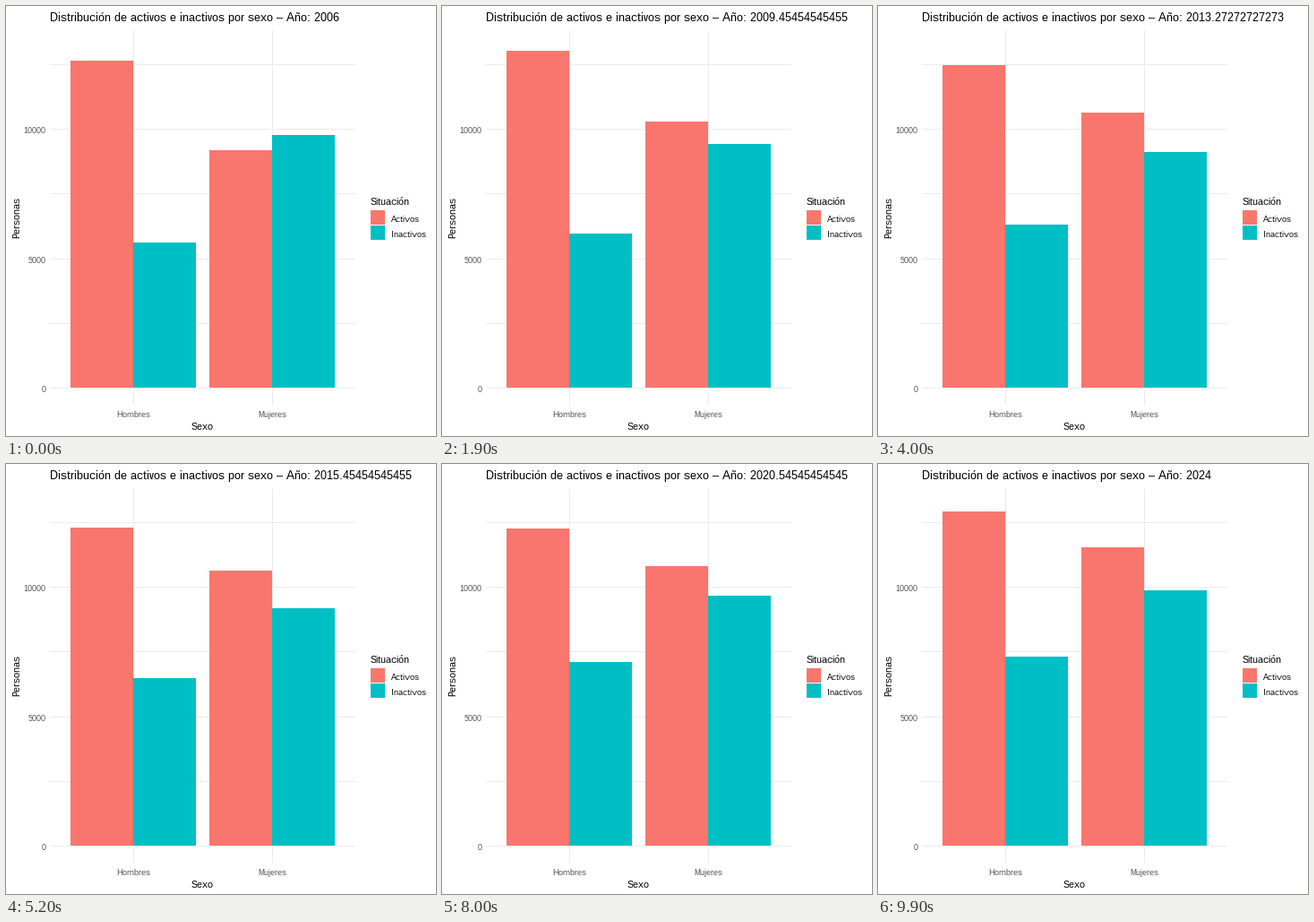
A matplotlib script that plays this animation: 480 by 480 pixels, repeating every 10000 ms.

```python
import numpy as np
import matplotlib.pyplot as plt
from matplotlib.animation import FuncAnimation
from matplotlib.patches import Rectangle

SIZE, DPI = 480, 72  # at 72 dpi one point is one pixel
FRAMES, INTERVAL = 100, 100
CORAL, TEAL, GRID, GREY = "#F8766D", "#00BFC4", "#EBEBEB", "#4D4D4D"
BASE = 426       # pixel row of the zero line
SCALE = 0.0289   # pixels per person
BAR_W = 70
TITLE, HEADING, SMALL = 13, 11, 9

# Crisp, fully hinted glyphs on whole pixels
plt.rcParams.update({"font.family": "Liberation Sans",
                     "text.hinting": "native",
                     "text.hinting_factor": 1})

# Turning points of the four trends, joined by straight lines
TURNS = [2006, 2008, 2011, 2014, 2018, 2020, 2021, 2024]
TRENDS = {
    (72, CORAL): [12629, 13124, 12878, 12320, 12248, 12162, 12318, 12906],
    (142, TEAL): [5605, 5764, 6166, 6359, 6688, 7086, 7079, 7301],
    (227, CORAL): [9169, 9941, 10612, 10612, 10643, 10643, 10920, 11522],
    (297, TEAL): [9757, 9605, 9214, 9065, 9359, 9688, 9619, 9861],
}

fig = plt.figure(figsize=(SIZE / DPI, SIZE / DPI), dpi=DPI, facecolor="white")
ax = fig.add_axes([0, 0, 1, 1])
ax.set_xlim(0, SIZE)
ax.set_ylim(SIZE, 0)
ax.axis("off")


def box(x, y, w, h, color, z=1):
    return ax.add_patch(Rectangle((x, y), w, h, fc=color, lw=0,
                                  antialiased=False, zorder=z))


def label(x, y, text, size, color="black", ha="left", **kw):
    return ax.text(x, y, text, fontsize=size, color=color, ha=ha,
                   va="baseline", **kw)


# Grid and axis labels
for persons in range(0, 12501, 2500):
    y = round(BASE - persons * SCALE)
    box(49, y, 341, 1, GRID)
    if persons % 5000 == 0:
        label(44.5, y + 5, str(persons), SMALL, GREY, "right")
for x, name in ((142, "Hombres"), (297, "Mujeres")):
    box(x, 27, 1, 418, GRID)
    label(x, 459, name, SMALL, GREY, "center")

label(219.5, 473, "Sexo", HEADING, ha="center")
label(15, 236, "Personas", HEADING, ha="center", rotation=90,
      rotation_mode="anchor")

# Legend
label(407, 222, "Situación", HEADING)
for y, color, name in ((228, CORAL, "Activos"), (245, TEAL, "Inactivos")):
    box(407, y, 16, 16, color)
    label(430, y + 13, name, SMALL)

title = label(49, 17, "", TITLE)
bars = [box(x, BASE, BAR_W, 0, color, 2) for x, color in TRENDS]


def update(i):
    year = TURNS[0] + (TURNS[-1] - TURNS[0]) * i / (FRAMES - 1)
    title.set_text("Distribución de activos e inactivos por sexo "
                   f"– Año: {year:.15g}")
    for bar, values in zip(bars, TRENDS.values()):
        top = round(float(BASE - SCALE * np.interp(year, TURNS, values)))
        bar.set_y(top)
        bar.set_height(BASE - top)
    return [title, *bars]


anim = FuncAnimation(fig, update, frames=FRAMES, interval=INTERVAL,
                     init_func=lambda: update(0), repeat=True, repeat_delay=0)
plt.show()
```
